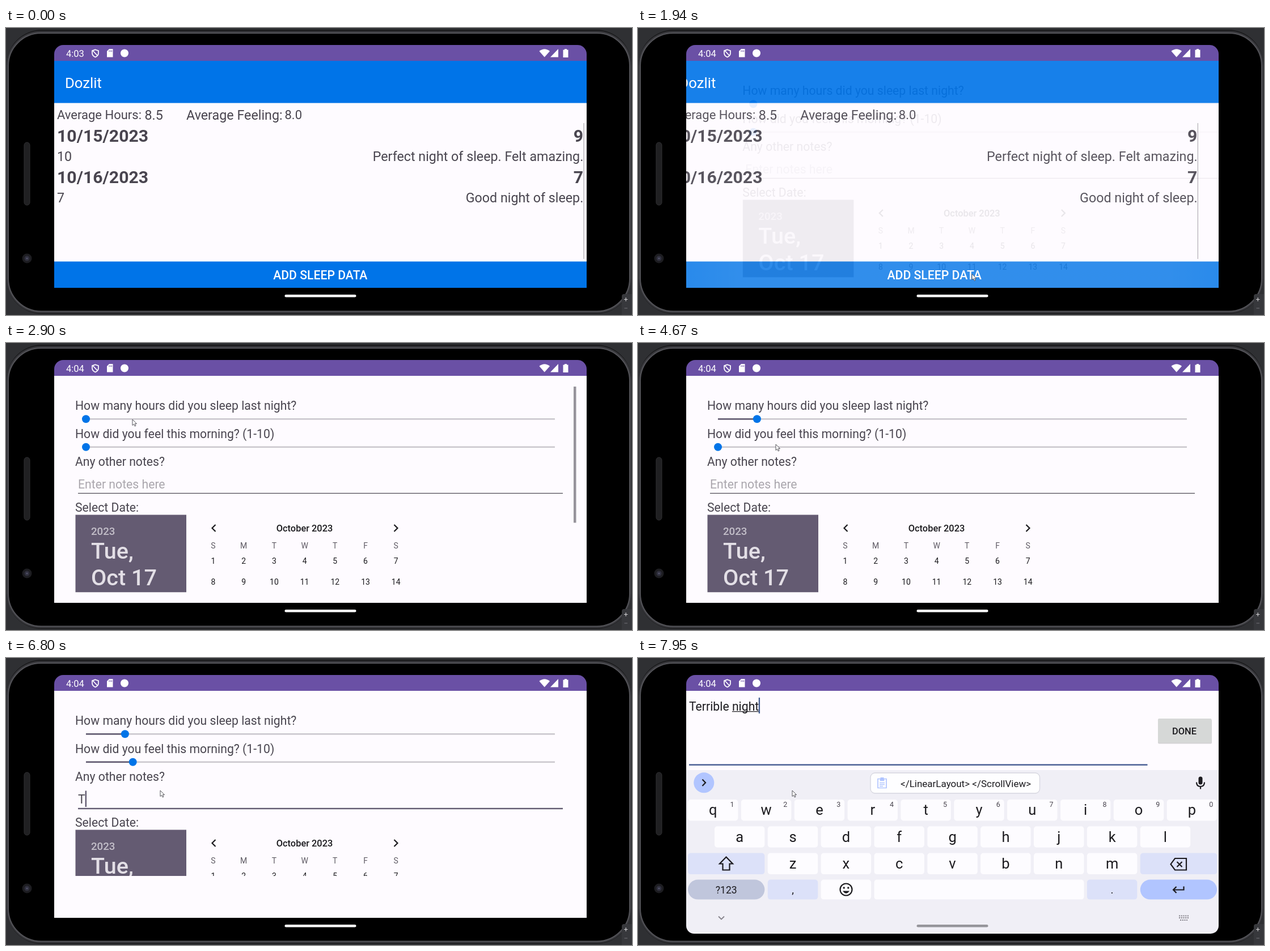
These frames come from a looping animation (1104x507 px, 8000 ms). An HTML page:

```html
<!DOCTYPE html>
<html lang="en">
<head>
<meta charset="utf-8">
<title>Sleep log</title>
<style>
html, body { margin: 0; width: 100%; height: 100%; overflow: hidden; background: #2f3033; }
svg { display: block; width: 1104px; height: 507px; font-family: Roboto, sans-serif; }
text { white-space: pre; }
.body { fill: #49454f; }
.hint { fill: #aaa7ad; }
.dark { fill: #1c1b1f; }
.mid { text-anchor: middle; }
.end { text-anchor: end; }
.med { font-weight: 500; }
.line { fill: none; stroke: #1c1b1f; stroke-width: 2.2; }
</style>
</head>
<body>
<svg viewBox="0 0 1104 507">
  <defs>
    <clipPath id="screen"><path d="M85 487V46a16 16 0 0 1 16-16H1008a16 16 0 0 1 16 16V473a14 14 0 0 1-14 14H99a14 14 0 0 1-14-14Z"/></clipPath>
    <clipPath id="app"><rect x="85" y="58" width="939" height="401"/></clipPath>
    <clipPath id="button"><rect x="85" y="412.500" width="1040" height="46.500"/></clipPath>
    <clipPath id="scroll"><rect id="scrollBox" x="85" y="58" width="939" height="382.5"/></clipPath>
    <radialGradient id="glow">
      <stop offset=".68" stop-color="#fff" stop-opacity=".11"/>
      <stop offset="1" stop-color="#fff" stop-opacity=".05"/>
    </radialGradient>
  </defs>

  <!-- phone -->
  <rect width="1104" height="507" fill="#2f3033"/>
  <rect x="1" y="3" width="1102" height="502" rx="62" fill="#1b1b1d"/>
  <rect x="4" y="8.500" width="1096" height="492" rx="58" stroke="#39393d" stroke-width="6"/>
  <rect x="4" y="9" width="1096" height="491.500" rx="58" stroke="#535358" stroke-width="2"/>
  <rect x="32" y="202" width="10" height="111" rx="5" fill="#202022" stroke="#303033"/>
  <circle cx="37" cy="407" r="8.5" fill="#1d1d21"/>
  <circle cx="37" cy="407" r="4.5" fill="#30303e"/>
  <circle cx="37" cy="407" r="1.5" fill="#55556c"/>

  <g clip-path="url(#screen)">
    <rect x="85" y="30" width="939" height="28.5" fill="#6a50a5"/>
    <g fill="#fff">
      <text id="clock" x="106" y="50.5" font-size="16.5"></text>
      <path d="M157.500 38.200L163 40.200V44.500Q163 49 157.500 51.500Q152 49 152 44.500V40.200ZM153.500 40.500L161.500 49" fill="none" stroke="#fff" stroke-width="1.7"/>
      <path d="M182 37H188.500V51.500H178V41Z"/>
      <path d="M182 39.500V42M184.300 39.500V42M186.500 39.500V42" stroke="#6a50a5"/>
      <circle cx="209" cy="44.500" r="7"/>
      <path d="M940.500 41Q949.700 33.500 959 41L949.700 51.500Z"/>
      <path d="M974 37V51.500H960Z"/>
      <path d="M985 37H989V38.500H991.500V52H982.500V38.500H985Z"/>
    </g>

    <g clip-path="url(#app)">
      <g id="list">
        <rect x="85" y="58" width="1040" height="401" fill="#fefbff"/>
        <rect x="85" y="58" width="1040" height="74.500" fill="#0074e8"/>
        <text x="104" y="106" font-size="25.700" fill="#fff">Dozlit</text>
        <g class="body" font-size="23.300">
          <text x="90" y="161" font-size="22">Average Hours:</text>
          <text x="244.500" y="162">8.5</text>
          <text x="318" y="162">Average Feeling:</text>
          <text x="491.500" y="161" font-size="22">8.0</text>
          <g id="entries"></g>
        </g>
        <rect x="1018.300" y="168" width="1.400" height="240" fill="#b5b2b8"/>
        <rect x="85" y="412.500" width="1040" height="46.500" fill="#0074e8"/>
        <g clip-path="url(#button)"><circle id="ripple" cx="589" cy="436" fill="url(#glow)"/></g>
        <text class="mid med" x="554.300" y="444" font-size="21.200" fill="#fff">ADD SLEEP DATA</text>
      </g>

      <g id="form">
        <rect x="-15" y="58" width="1140" height="401" fill="#fefbff"/>
        <g clip-path="url(#scroll)">
          <g class="body" font-size="21.200">
            <text x="122" y="118">How many hours did you sleep last night?</text>
            <text x="122" y="167.500">How did you feel this morning? (1-10)</text>
            <text x="122" y="217">Any other notes?</text>
            <text id="hint" class="hint" x="127" y="257">Enter notes here</text>
            <text id="note" x="127" y="257"></text>
            <text x="122" y="298">Select Date:</text>
          </g>
          <g id="sliders"></g>
          <rect id="noteLine" x="127" width="855"/>
          <rect id="noteCaret" y="234.500" width="2.400" height="28.500" fill="#625b71"/>
          <rect x="122.500" y="303.500" width="195.500" height="137" fill="#645b72"/>
          <g class="med" fill="#e3dfe6">
            <text x="150" y="339" font-size="18.700" fill="#c3bfc9">2023</text>
            <text x="150" y="381" font-size="39.600">Tue,</text>
            <text x="150" y="428" font-size="39.600">Oct 17</text>
          </g>
          <text class="dark mid med" x="526.500" y="332.500" font-size="16.400">October 2023</text>
          <path class="line" d="M369.500 321L363.500 327L369.500 333M684.500 321L690.500 327L684.500 333"/>
          <g id="days" class="mid" font-size="14"></g>
        </g>
        <rect id="bar" x="1001" y="77" width="4.500" height="240.500" fill="#97949b"/>
      </g>
    </g>

    <g id="ime">
      <rect x="85" y="58" width="939" height="141" fill="#fefbff"/>
      <text id="typed" class="dark" x="90" y="92.500" font-size="21.200"></text>
      <rect id="compose" y="94" height="1.200" class="dark"/>
      <rect id="caret" y="70" width="2.300" height="28" fill="#445e91"/>
      <rect x="90" y="187.500" width="808.500" height="2.400" fill="#445a92"/>
      <rect x="917" y="108.500" width="95" height="43" rx="2" fill="#000" opacity=".16"/>
      <rect x="917" y="107" width="94.500" height="42.500" rx="2" fill="#d6d8d7"/>
      <text class="dark mid med" x="963.500" y="134.500" font-size="16.400">DONE</text>

      <rect x="85" y="198" width="939" height="290" fill="#f0eff6"/>
      <circle cx="116.300" cy="220.300" r="18" fill="#b1c5ff"/>
      <path class="line" d="M113.500 214.500L119 220.300L113.500 226"/>
      <rect x="410" y="203" width="298.500" height="36" rx="8" fill="#fefeff" stroke="#d6d6df" stroke-width="1.300"/>
      <path d="M423 213.500H438V229.500H423ZM427.500 213.500V216.500H433.500V213.500ZM426 220.500H435M426 223.500H435M426 226.500H432" fill="none" stroke="#b1c5ff" stroke-width="1.700"/>
      <path d="M427.500 211H433.500V216H427.500Z" fill="#b1c5ff"/>
      <text class="dark" x="463" y="228" font-size="17">&lt;/LinearLayout&gt; &lt;/ScrollView&gt;</text>
      <rect class="dark" x="988.500" y="209.500" width="7" height="14" rx="3.500"/>
      <path class="line" d="M985 219.500Q985 227 992 227T999 219.500M992 227V231.500"/>
      <g id="keys" class="mid"></g>
      <path class="line" d="M155.500 351.500L167 363.500H161.500V374.500H149.500V363.500H144Z"/>
      <path class="line" d="M947 354H967V374.500H947L939.500 364.200ZM950.500 360L959.500 369M959.500 360L950.500 369"/>
      <circle class="line" cx="367" cy="409" r="10.500"/>
      <circle class="dark" cx="363.200" cy="406" r="1.700"/>
      <circle class="dark" cx="370.800" cy="406" r="1.700"/>
      <path d="M361 411.500Q367 420 373 411.500Z" class="dark"/>
      <path class="line" d="M962.500 403.500V409.500H944.500M949.500 404L944 409.500L949.500 415"/>
      <g id="navIcons" fill="none" stroke="#85838b">
        <path d="M142 456.500L147 461.500L152 456.500" stroke-width="1.800"/>
        <path d="M954 455.500H971M954 459H971M956 463H969" stroke-width="2" stroke-dasharray="2.200 1.500"/>
      </g>
    </g>
  </g>
  <rect id="handle" x="491.500" y="471" width="126" height="4.600" rx="2.300"/>

  <path d="M1086 507V474a4 4 0 0 1 4-4H1104V507Z" fill="#37383c"/>
  <path d="M1090 479.500H1096.500M1093.200 476.200V482.700" stroke="#d0d0d2" stroke-width="1.200"/>
  <path d="M1090.500 495H1096" stroke="#6a6a6e" stroke-width="1.200"/>
  <path id="cursor" d="M0 0V10.500L2.500 8.300L4.200 12L6 11.200L4.400 7.600H7.500Z" fill="#fff" stroke="#44434a" stroke-width=".9"/>
</svg>

<script>
const $ = id => document.getElementById(id);
const set = (id, attrs) => { for (const k in attrs) $(id).setAttribute(k, attrs[k]); };
const clamp = v => Math.max(0, Math.min(1, v));
const ramp = (t, from, to) => clamp((t - from) / (to - from));
const label = (x, y, s, size, cls) => `<text x="${x}" y="${y}" font-size="${size}" class="${cls}">${s}</text>`;

const entries = [
  ['10/15/2023', 10, 9, 'Perfect night of sleep. Felt amazing.'],
  ['10/16/2023', 7, 7, 'Good night of sleep.']
];
$('entries').innerHTML = entries.map(([date, hours, feeling, note], i) => {
  const y = 201 + i * 72.5;
  return `<g font-weight="700">${label(90, y, date, 30.2, '')}${label(1018, y, feeling, 30.2, 'end')}</g>` +
    label(90, y + 34, hours, 23.3, '') + label(1018.3, y + 34, note, 23.25, 'end');
}).join('');

$('sliders').innerHTML = [134.3, 183.8].map((y, i) =>
  `<rect x="141" y="${y - 1.3}" width="827" height="2.6" fill="#cbc8ce"/>
   <rect id="fill${i}" x="141" y="${y - 1.3}" height="2.6" fill="#625b71"/>
   <circle id="thumb${i}" cy="${y}" r="7" fill="#0074e8"/>`).join('');

$('days').innerHTML = [...'SMTWTFS'].map((d, i) => {
  const x = 365.5 + 53.7 * i;
  return `<g fill="#5f5b64">${label(x, 363, d, 14, '')}</g>` +
    label(x, 390, i + 1, 14, 'dark') + label(x, 427, i + 8, 14, 'dark');
}).join('');

const PITCH = 93.85;
function key(col, y, span, text, fill = '#fdfcff', round = 5, h = 37.5, size = 25.5) {
  const x = 88 + col * PITCH, w = span * PITCH - 5.4;
  return `<rect x="${x}" y="${y}" width="${w}" height="${h}" rx="${round}" fill="${fill}"/>` +
    label(x + w / 2, y + (size < 20 ? 24 : 27.3), text, size, 'dark');
}
const row = (letters, col, y) => [...letters].map((c, i) => key(col + i, y, 1, c)).join('');
const soft = '#dce1f9';
$('keys').innerHTML = row('qwertyuiop', 0, 250) + row('asdfghjkl', .5, 297.3) + row('zxcvbnm', 1.5, 344.6) +
  [...'1234567890'].map((d, i) => label(166 + i * PITCH, 263, d, 12.5, 'body')).join('') +
  key(0, 344.6, 1.5, '', soft) + key(8.5, 344.6, 1.5, '', soft) +
  key(0, 391.6, 1.5, '?123', '#c0c6dc', 17.5, 35, 17.5) + key(1.5, 391.6, 1, ',', soft, 5, 35, 19) +
  key(2.5, 391.6, 1, '', undefined, 5, 35) + key(3.5, 391.6, 4, '', undefined, 5, 35) +
  key(7.5, 391.6, 1, '.', soft, 5, 35, 19) + key(8.5, 391.6, 1.5, '', '#b1c5ff', 17.5, 35);

// pointer path: time, x, y
const path = [
  [110, 1053, 495], [320, 627, 439], [460, 627, 439], [790, 581, 433], [1260, 581, 433],
  [1320, 575, 427], [1400, 575, 427], [1460, 589, 434.5], [2140, 589, 434.5], [2700, 229, 139],
  [2900, 223, 135], [3100, 214, 134], [3300, 214, 134], [3860, 203, 133], [4000, 203, 133],
  [4400, 305, 172], [4670, 243, 179], [4760, 243, 179], [5160, 156, 183], [5380, 156, 183],
  [5700, 222, 182], [5800, 222, 182], [6190, 253, 247], [6400, 272, 234], [8000, 272, 234]
];
function pointer(t) {
  const i = path.findIndex(p => p[0] > t);
  const [t0, x0, y0] = path[i - 1], [t1, x1, y1] = path[i], k = ramp(t, t0, t1);
  return [x0 + (x1 - x0) * k, y0 + (y1 - y0) * k];
}

function slide(i, x) {
  set('thumb' + i, { cx: x });
  set('fill' + i, { width: x - 141 });
}

const SENTENCE = 'Terrible night';
function typedCount(t) {
  if (t < 6800) return 0;
  if (t < 7550) return Math.min(8, 1 + Math.floor((t - 6800) / 78));
  return Math.min(14, 9 + Math.floor((t - 7550) / 80));
}

function draw(t) {
  $('clock').textContent = t < 1530 ? '4:03' : '4:04';
  set('cursor', { visibility: t < 110 ? 'hidden' : 'visible' });
  if (t >= 110) set('cursor', { transform: `translate(${pointer(t)})` });

  set('ripple', { r: t < 1460 ? 0 : 40 + 520 * ramp(t, 1460, 1800) });

  const left = 94 * (1 - ramp(t, 1900, 2350)) ** 4.3;
  set('list', { transform: `translate(${left - 94})`, visibility: t < 2140 ? 'visible' : 'hidden' });
  set('form', { transform: `translate(${left})`, opacity: ramp(t, 1930, 2050) });
  set('bar', { opacity: 1 - ramp(t, 3300, 3560) });

  slide(0, t < 3430 ? 141 : 209.9);
  slide(1, t < 5510 ? 141 : 223.7);

  const text = SENTENCE.slice(0, typedCount(t));
  const focus = t >= 6120;
  set('noteLine', focus ? { y: 264.8, height: 2.4, fill: '#625b71' } : { y: 264.9, height: 1.2, fill: '#49454f' });
  $('hint').style.visibility = text ? 'hidden' : 'visible';
  $('note').textContent = text;
  set('noteCaret', {
    x: 127 + (text ? $('note').getComputedTextLength() : 0),
    visibility: focus && (t < 6600 || t >= 6800) ? 'visible' : 'hidden'
  });
  set('scrollBox', { height: t < 6800 ? 382.5 : 327 });

  const drop = 430 * (1 - ramp(t, 6840, 7160)) ** 2.5;
  set('ime', { transform: `translate(0 ${drop})`, visibility: t < 6840 ? 'hidden' : 'visible' });
  const typed = $('typed');
  typed.textContent = text;
  const width = text ? typed.getComputedTextLength() : 0;
  const word = text.lastIndexOf(' ') + 1;
  const start = word ? typed.getSubStringLength(0, word) : 0;
  set('compose', { x: 90 + start, width: Math.max(0, width - start) });
  set('caret', { x: 89.5 + width });

  const nav = ramp(t, 7540, 7700);
  const shade = (from, to) => Math.round(from + (to - from) * nav);
  set('navIcons', { opacity: nav });
  set('handle', { fill: `rgb(${shade(255, 150)},${shade(255, 149)},${shade(255, 155)})` });
}

const begin = performance.now();
function tick() {
  draw((performance.now() - begin) % 8000);
  requestAnimationFrame(tick);
}
draw(0);
requestAnimationFrame(tick);
</script>
</body>
</html>
```
